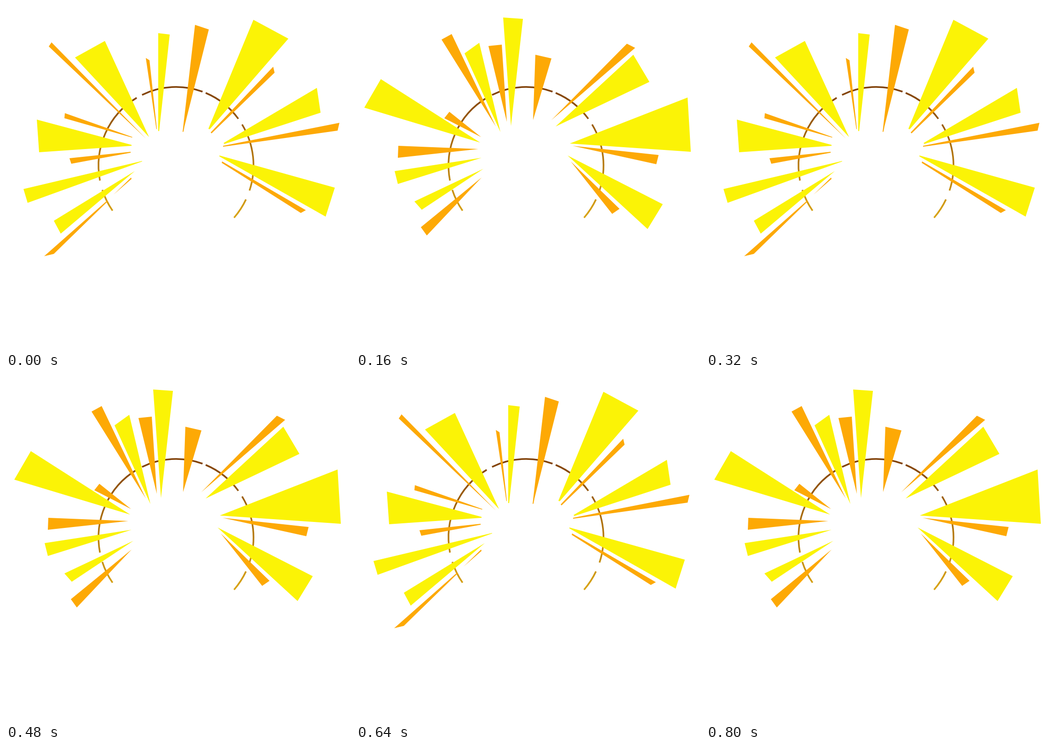
An HTML page with a canvas for the animation above (960 ms loop, 748 by 748 pixels).

```html
<!DOCTYPE html>
<html lang="en">
<head>
<meta charset="utf-8">
<title>Sunburst</title>
<style>
  html, body { margin: 0; width: 100%; height: 100%; overflow: hidden; background: #fff; }
  canvas { display: block; }
</style>
</head>
<body>
<canvas id="stage" width="748" height="748"></canvas>
<script>
const ctx = document.getElementById('stage').getContext('2d');
const POSE_MS = 160;
const YELLOW = '#fbf306';
const ORANGE = '#fda905';

// Each pose is a burst of closed tapering rays, grouped by colour.
const poses = [
  {
    [YELLOW]: `M331,59 356,62 333,272 331,272Z M150,112 215,76 311,285Z
      M67,247 273,302 273,304 72,318Z M38,398 296,337 296,338 47,428Z
      M104,467 280,359 119,495Z M538,30 614,71 443,268 440,267Z
      M676,178 684,232 475,300 473,298Z M464,325 715,395 695,458 464,327Z`,
    [ORANGE]: `M99,79 304,288 93,88Z M128,233 275,285 274,286 127,244Z
      M138,331 271,317 271,319 142,343Z M304,113 312,118 328,267 327,268Z
      M411,41 441,51 388,262 386,273 384,274Z M581,132 584,145 447,277 445,275Z
      M725,254 721,271 472,306 472,304Z M470,338 652,444 641,450 469,341Z
      M83,544 104,539 222,424 220,423Z M234,410 273,376 272,373Z`
  },
  {
    [YELLOW]: `M320,25 363,28 337,261Z M236,103 268,80 314,274Z
      M54,159 270,297 18,221Z M84,359 273,330 91,387Z
      M127,425 277,354 143,443Z M603,106 638,165 434,262Z
      M721,199 728,317 465,299Z M460,325 667,431 634,485Z`,
    [ORANGE]: `M186,73 208,61 304,262Z M288,87 317,84 328,252Z
      M390,106 425,114 385,248Z M589,82 607,91 425,248Z
      M471,304 658,324 653,344Z M467,338 573,441 557,452Z
      M203,230 272,285 192,244Z M92,304 266,311 91,330Z
      M141,481 273,373 154,499Z`
  }
].map(pose => Object.entries(pose).map(([color, d]) => [color, new Path2D(d)]));

// Ring pieces as start and end angles in degrees, clockwise from the right.
const ringPieces = [
  [145, 162], [169, 239.5], [244, 290], [292.5, 323.5], [328.5, 378.5], [385.5, 401.5]
];
const ringColor = ctx.createLinearGradient(0, 176, 0, 460);
ringColor.addColorStop(0, '#7f3f06');
ringColor.addColorStop(0.5, '#af720d');
ringColor.addColorStop(1, '#d9a514');

function drawRing() {
  ctx.strokeStyle = ringColor;
  ctx.lineWidth = 3.6;
  for (const piece of ringPieces) {
    const [from, to] = piece.map(deg => deg * Math.PI / 180);
    ctx.beginPath();
    ctx.ellipse(369.7, 347, 168.5, 171, 0, from, to);
    ctx.stroke();
  }
}

function draw(time) {
  ctx.clearRect(0, 0, 748, 748);
  drawRing();
  for (const [color, rays] of poses[Math.floor(time / POSE_MS) % poses.length]) {
    ctx.fillStyle = color;
    ctx.fill(rays);
  }
}

const start = performance.now();
function tick() {
  draw(performance.now() - start);
  requestAnimationFrame(tick);
}
tick();
</script>
</body>
</html>
```
